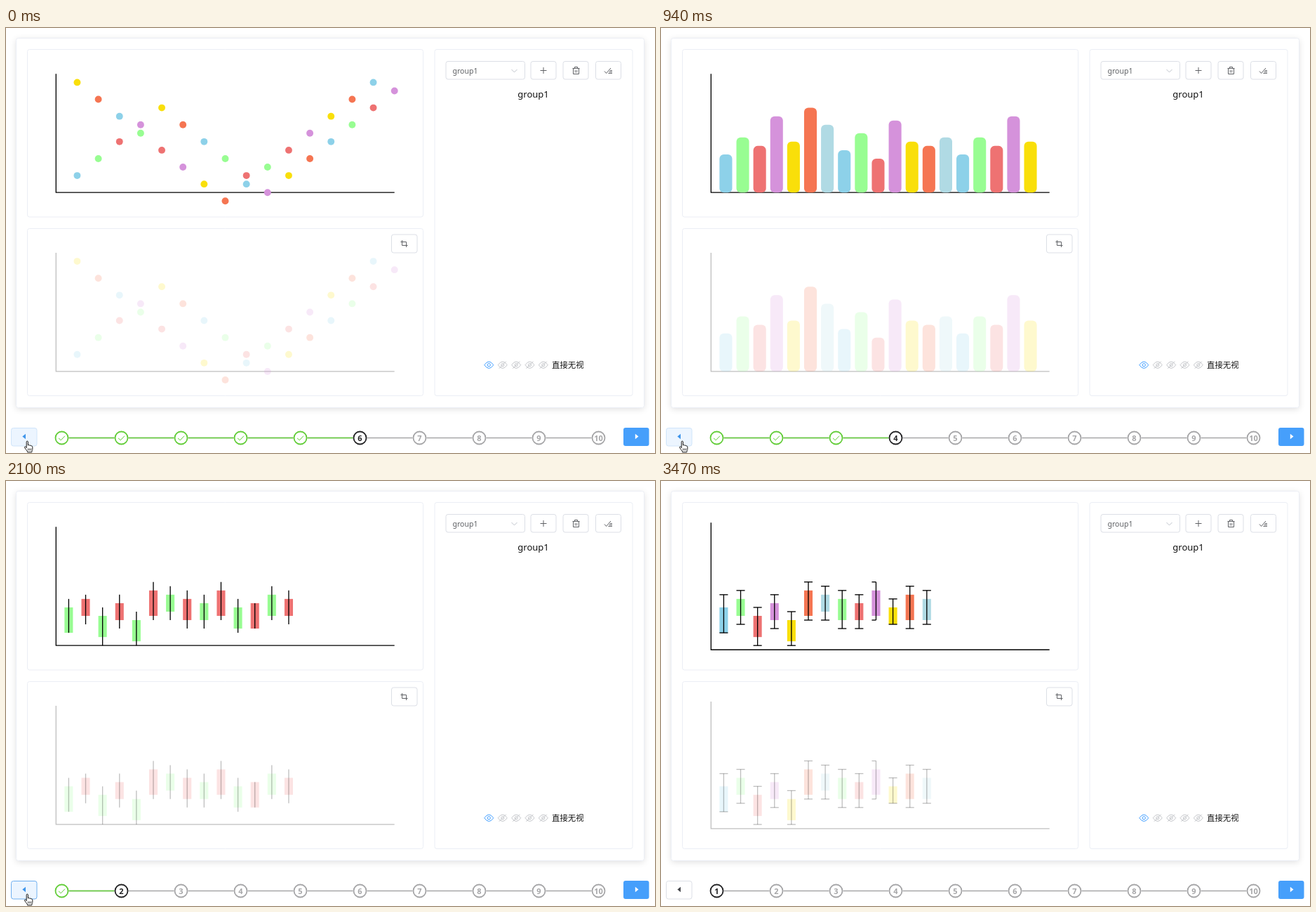
Recreate the animation shown at these times as an HTML page with a canvas. Size 925 by 605 pixels, loop 3.5 s.

```html
<!DOCTYPE html>
<html lang="zh">
<head>
<meta charset="utf-8">
<style>
  html, body { margin: 0; width: 100%; height: 100%; overflow: hidden; background: #fff; }
  canvas { display: block; width: 925px; height: 605px; }
</style>
</head>
<body>
<canvas id="stage"></canvas>
<script>
const W = 925, H = 605, LOOP = 3500, UNIT = 1.206, FADE = 150;
const CLICKS = [350, 785, 1280, 1690, 2130];
const LEAVE = 2580, EXIT = 3150;

const sky = '#8dd1e9', green = '#98fd92', red = '#ee7272', purple = '#d592db',
      yellow = '#f9df0a', orange = '#f57552', pale = '#b0dae4';
const CYCLE = [sky, green, red, purple, yellow, orange, pale];
const DONE = [98, 205, 56], ACTIVE = [34, 34, 36], WAIT = [166, 166, 168];

// Each scatter column holds two heights, spaced 25 units apart
const DOTS = [
  [130, yellow, 20, sky], [110, orange, 40, green], [90, sky, 60, red], [80, purple, 70, green],
  [100, yellow, 50, red], [80, orange, 30, purple], [60, sky, 10, yellow], [40, green, -10, orange],
  [20, red, 10, sky], [30, green, 0, purple], [50, red, 20, yellow], [70, purple, 40, orange],
  [90, yellow, 60, sky], [110, orange, 80, green], [130, sky, 100, red], [120, purple]
];
const BARS = [45, 65, 55, 90, 60, 100, 80, 50, 70, 40, 85, 60, 55, 65, 45, 65, 55, 90, 60];
// high, box top, box bottom, low
const BOXES = [
  [60, 45, 15, 15], [65, 55, 35, 25], [45, 35, 10, 0], [60, 50, 30, 20], [40, 30, 5, 0],
  [75, 65, 35, 30], [70, 60, 40, 30], [65, 55, 30, 20], [60, 50, 30, 20], [75, 65, 35, 30],
  [55, 45, 25, 25], [70, 60, 30, 20], [65, 55, 30, 25]
];
const CANDLES = [
  [55, 45, 15, 15], [60, 55, 35, 25], ...BOXES.slice(2, 10),
  [55, 45, 20, 15], [50, 50, 20, 20], [70, 60, 35, 30], [65, 55, 35, 25]
];
const SLICES = [[0, 60, sky], [60, 90, green], [90, 150, red], [150, 210, purple],
                [210, 300, yellow], [300, 360, orange]];
const CURVE = new Path2D('M10 20Q16 28 24 37.5Q34 50 44 66Q56 85 68 98L100 130' +
                         'Q110 140 120 130L250 0Q260 -10 270 0L400 130');

const canvas = document.getElementById('stage');
const ctx = canvas.getContext('2d');
const dpr = window.devicePixelRatio || 1;
canvas.width = W * dpr;
canvas.height = H * dpr;

const clamp = x => Math.max(0, Math.min(1, x));
const smooth = x => { x = clamp(x); return x * x * (3 - 2 * x); };
const mix = (a, b, p) => `rgb(${a.map((v, i) => Math.round(v + (b[i] - v) * p))})`;

function line(color, width, ...pts) {
  ctx.strokeStyle = color;
  ctx.lineWidth = width;
  ctx.beginPath();
  for (let i = 0; i < pts.length; i += 2) ctx.lineTo(pts[i], pts[i + 1]);
  ctx.stroke();
}

function fillPoly(color, ...pts) {
  ctx.fillStyle = color;
  ctx.beginPath();
  for (let i = 0; i < pts.length; i += 2) ctx.lineTo(pts[i], pts[i + 1]);
  ctx.fill();
}

function disc(x, y, r, fill) {
  ctx.fillStyle = fill;
  ctx.beginPath();
  ctx.arc(x, y, r, 0, 7);
  ctx.fill();
}

function box(x, y, w, h, stroke, fill = '#fff', r = 3) {
  ctx.beginPath();
  ctx.roundRect(x, y, w, h, r);
  ctx.fillStyle = fill;
  ctx.fill();
  if (!stroke) return;
  ctx.strokeStyle = stroke;
  ctx.lineWidth = 1;
  ctx.stroke();
}

function text(str, x, y, font, color, align = 'left') {
  ctx.font = font;
  ctx.fillStyle = color;
  ctx.textAlign = align;
  ctx.fillText(str, x, y);
}

// Charts are drawn in units with y pointing up; alpha(part, i) gives each opacity
function axes(alpha, top, bottom) {
  ctx.globalAlpha = alpha('axis', 0);
  line('#000', 1.1, 0, top, 0, bottom, 400, bottom);
}

function boxChart(alpha) {
  axes(alpha, 145, -5);
  BOXES.forEach(([high, top, bottom, low], i) => {
    const x = 15 + 20 * i, right = i === 9 ? x : x + 5;
    ctx.globalAlpha = alpha('mark', i);
    ctx.fillStyle = CYCLE[i < 7 ? i : i - 6];
    ctx.fillRect(x - 5, bottom, 10, top - bottom);
    ctx.globalAlpha = alpha('wick', i);
    line('#000', 1.1, x, high, x, low);
    line('#000', 1.1, x - 5, high, right, high);
    line('#000', 1.1, x - 5, low, right, low);
  });
}

function candleChart(alpha) {
  axes(alpha, 140, 0);
  CANDLES.forEach(([high, top, bottom, low], i) => {
    const x = 15 + 20 * i;
    ctx.globalAlpha = alpha('mark', i);
    ctx.fillStyle = i % 2 ? red : green;
    ctx.fillRect(x - 5, bottom, 10, top - bottom);
    ctx.globalAlpha = alpha('wick', i);
    line('#000', 1.1, x, high, x, low);
  });
}

function lineChart(alpha) {
  axes(alpha, 140, 0);
  ctx.beginPath();
  ctx.rect(-10, -15, 420, 165);
  ctx.clip();
  ctx.lineWidth = 1.1;
  ['#0000e0', '#148414', '#d80000', '#700074'].forEach((color, i) => {
    ctx.globalAlpha = alpha('mark', i);
    ctx.strokeStyle = color;
    ctx.stroke(CURVE);
    ctx.translate(0, -10);
  });
}

function barChart(alpha) {
  axes(alpha, 140, 0);
  BARS.forEach((h, i) => {
    ctx.globalAlpha = alpha('mark', i);
    box(10 + 20 * i, 0, 15, h, null, CYCLE[i % 7], 5);
  });
}

function pieChart(alpha) {
  SLICES.forEach(([from, to, color], i) => {
    const rad = deg => (90 - deg) * Math.PI / 180;
    ctx.globalAlpha = alpha('mark', i);
    ctx.fillStyle = color;
    ctx.beginPath();
    ctx.moveTo(200.2, 70);
    ctx.arc(200.2, 70, 50, rad(from), rad(to), true);
    ctx.fill();
  });
  if (alpha('mark', 0) < 1) {
    ctx.globalAlpha = 0.04;
    disc(200.2, 70, 50, '#000');
  }
}

function dotChart(alpha) {
  axes(alpha, 140, 0);
  DOTS.forEach((col, i) => {
    ctx.globalAlpha = alpha('mark', i);
    for (let j = 0; j < col.length; j += 2) disc(25 * (i + 1), col[j], 4.1, col[j + 1]);
  });
}

const CHARTS = [boxChart, candleChart, lineChart, barChart, pieChart, dotChart];

function chart(index, y, alpha) {
  ctx.save();
  ctx.translate(71.3, y);
  ctx.scale(UNIT, -UNIT);
  CHARTS[index](alpha);
  ctx.restore();
}

// The lower copy turns faint part by part after a change
function ghost(index, age) {
  return (part, i) => {
    let start = part === 'axis' ? 0 : 60;
    if (index === 1) {
      start = part === 'axis' ? 200 : (part === 'wick' ? 30 : 90) + 12 * (CANDLES.length - 1 - i);
    }
    return age < start ? 1 : part === 'mark' ? 0.2 : 0.25;
  };
}

function eye(x, y, color, off) {
  ctx.strokeStyle = color;
  ctx.lineWidth = 1;
  ctx.beginPath();
  ctx.moveTo(x - 6.5, y);
  ctx.quadraticCurveTo(x, y - 9.5, x + 6.5, y);
  ctx.quadraticCurveTo(x, y + 9.5, x - 6.5, y);
  ctx.stroke();
  ctx.beginPath();
  ctx.arc(x, y, 2.1, 0, 7);
  ctx.stroke();
  if (off) line(color, 1, x - 5, y + 5, x + 5, y - 5);
}

function frame() {
  ctx.fillStyle = '#fff';
  ctx.fillRect(0, 0, W, H);
  ctx.save();
  ctx.shadowColor = 'rgba(0,0,0,.13)';
  ctx.shadowBlur = 10 * dpr;
  ctx.shadowOffsetY = 2 * dpr;
  box(14.5, 14.5, 895, 526, null);
  ctx.restore();
  box(14.5, 14.5, 895, 526, '#ebeef5');
  box(30.5, 30.5, 564, 238.5, '#ebeef5');
  box(30.5, 285.5, 564, 238, '#ebeef5');
  box(611, 30.5, 282, 493, '#ebeef5');
}

function controls() {
  const edge = '#dcdfe6', ink = '#606266';
  box(627, 47.5, 112.5, 25.5, edge);
  [748, 794, 840.5].forEach(x => box(x, 47.5, 36, 25.5, edge));
  box(549.5, 294, 36.5, 26, edge);
  text('group1', 636.5, 65, '10.5px "Noto Sans", sans-serif', ink);
  text('group1', 751.5, 98.5, '13px "Noto Sans", sans-serif', '#111', 'center');
  line('#c0c4cc', 1, 720.5, 59, 724.5, 63, 728.5, 59);
  line(ink, 1, 761.5, 60.5, 770.5, 60.5);
  line(ink, 1, 766, 56, 766, 65);
  // Bin
  line(ink, 1, 807.5, 57.5, 817.5, 57.5);
  line(ink, 1, 810.5, 57, 810.5, 55.5, 814.5, 55.5, 814.5, 57);
  line(ink, 1, 808.5, 57.5, 808.5, 65.5, 816.5, 65.5, 816.5, 57.5);
  line(ink, 1, 811.3, 60, 811.3, 63.5);
  line(ink, 1, 813.7, 60, 813.7, 63.5);
  // Check with list
  line(ink, 1, 853, 61.5, 855.5, 64.5, 862, 57);
  line(ink, 1, 860.5, 60.5, 864, 60.5);
  line(ink, 1, 858.5, 64.5, 864, 64.5);
  line(ink, 1, 859.5, 62.5, 864, 62.5);
  // Crop
  line(ink, 1, 564.5, 302, 564.5, 309.5, 572.5, 309.5);
  line(ink, 1, 562.5, 304.5, 570.5, 304.5, 570.5, 312);
  eye(688.3, 479.7, '#409eff', false);
  [707.8, 727.2, 746.5, 765.8].forEach(x => eye(x, 479.7, '#c4c6ca', true));
  text('直接无视', 778, 484, '11.4px "Noto Sans CJK SC", "Noto Sans CJK", sans-serif', '#111');
}

function steps(active, p) {
  const y = 583.5;
  const tone = (i, current) => i < current ? DONE : i === current ? ACTIVE : WAIT;
  for (let i = 0; i < 10; i++) {
    const x = 79.5 + 85 * i;
    const color = mix(tone(i, active + 1), tone(i, active), p);
    if (i < 9) {
      line(mix(WAIT, WAIT, 0), 1.7, x + 10, y, x + 75, y);
      const full = i < active ? 1 : i === active ? 1 - p : 0;
      if (full > 0) line(mix(DONE, DONE, 0), 1.7, x + 10, y, x + 10 + 65 * full, y);
    }
    ctx.strokeStyle = color;
    ctx.lineWidth = 1.8;
    ctx.beginPath();
    ctx.arc(x, y, 9, 0, 7);
    ctx.stroke();
    if (i < active) line(color, 1, x - 4.5, y + 0.3, x - 1.3, y + 3.3, x + 4.5, y - 2.8);
    else text(i + 1, x, y + 4.5, 'bold 11px "Noto Sans", sans-serif', color, 'center');
  }
}

function pager(t) {
  const hover = 1 - clamp((t - LEAVE) / 100);
  const press = Math.max(...CLICKS.map(c =>
    t < c ? clamp((t - c + 70) / 60) : 1 - clamp((t - c) / 90)));
  const rest = mix([220, 223, 230], [208, 229, 250], hover).match(/\d+/g).map(Number);
  box(7.5, 569.5, 36.5, 25.5, mix(rest, [64, 150, 235], press),
      mix([255, 255, 255], [236, 245, 255], hover));
  fillPoly(mix([70, 72, 76], [64, 150, 235], hover), 28, 577.7, 28, 585.3, 23.3, 581.5);
  box(880, 569, 36.5, 26, null, '#469ffb');
  fillPoly('#fff', 896.8, 577.7, 896.8, 585.3, 901.5, 581.5);
}

const HAND = new Path2D('M3.2 1.2C3.2-.3 5.4-.3 5.4 1.2V6C6.3 5.2 7.5 5.5 7.8 6.4' +
  'C8.7 5.9 9.8 6.2 10 7.1C11 6.7 11.8 7.3 11.8 8.4V11.5C11.8 13 10.8 13.8 10.8 15.8' +
  'H4.6C4.6 13.7 2 12 .6 9.4C0 8.2 1.4 7.4 2.2 8.4L3.2 9.6Z');
const ARROW = new Path2D('M0 0V13L3 10.2L5 14.8L7 14L5 9.6H9.2Z');

function cursor(t) {
  if (t > EXIT) return;
  const p = smooth((t - LEAVE + 40) / (EXIT - LEAVE + 40));
  ctx.save();
  ctx.translate(26 + 130 * p, 588 - 605 * p);
  const shape = t < LEAVE ? HAND : ARROW;
  ctx.fillStyle = '#fff';
  ctx.fill(shape);
  ctx.strokeStyle = '#111';
  ctx.lineWidth = 1;
  ctx.stroke(shape);
  if (t < LEAVE) [5.6, 7.6, 9.6].forEach(x => line('#111', 0.8, x, 10.5, x, 13.5));
  ctx.restore();
}

function draw(now) {
  const t = now % LOOP;
  const clicked = CLICKS.filter(c => t >= c).length;
  const active = 5 - clicked;
  const age = clicked ? t - CLICKS[clicked - 1] : LOOP;
  ctx.setTransform(dpr, 0, 0, dpr, 0, 0);
  frame();
  chart(active, 234.2, () => 1);
  chart(active, 488.9, ghost(active, age));
  controls();
  steps(active, smooth(age / FADE));
  pager(t);
  cursor(t);
}

const begin = performance.now();
function tick() {
  draw(performance.now() - begin);
  requestAnimationFrame(tick);
}
tick();
</script>
</body>
</html>
```
